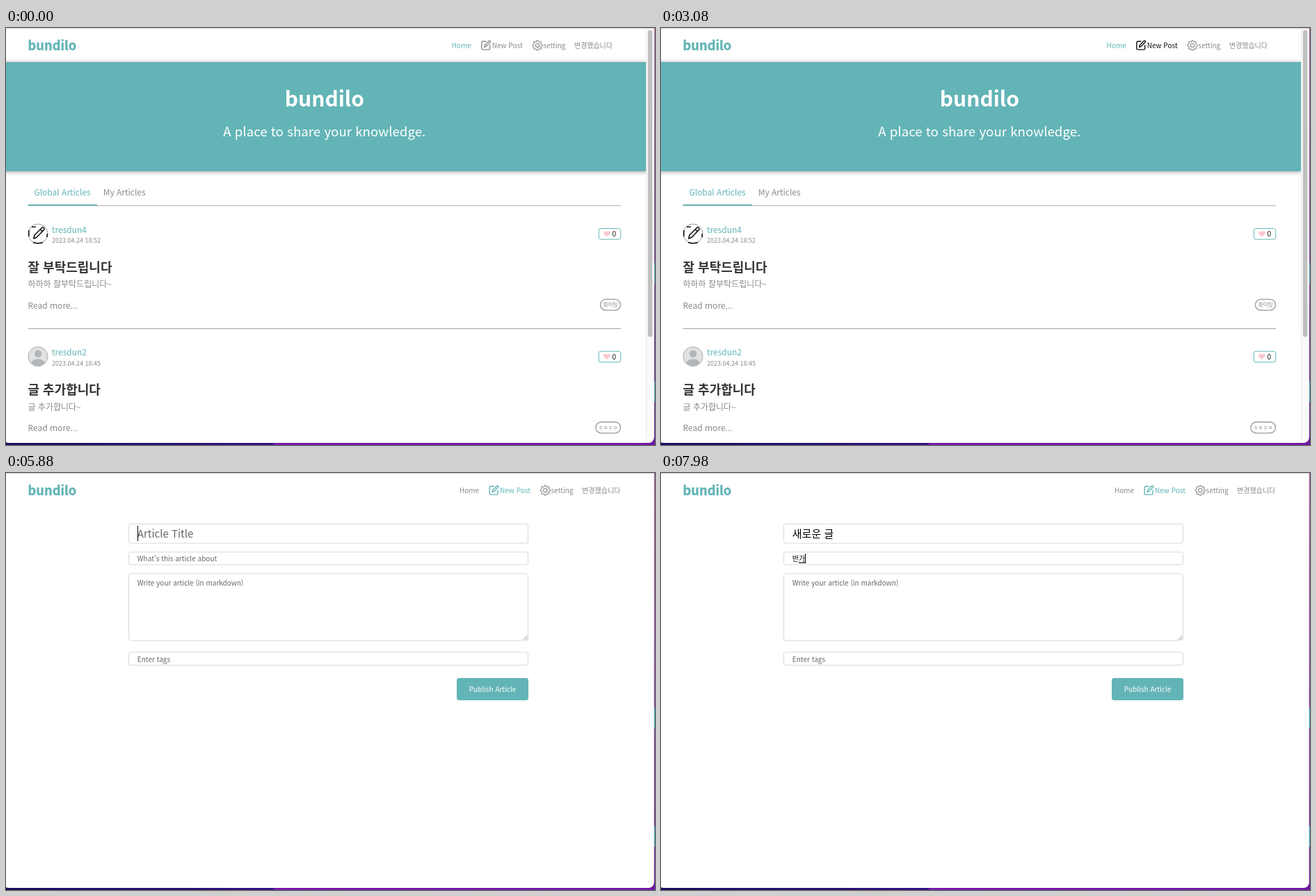
An HTML page for the animation above (8000 ms loop, 933x600 px).

```html
<!DOCTYPE html>
<html lang="ko">
<head>
<meta charset="utf-8">
<style>
html, body { margin: 0; width: 100%; height: 100%; overflow: hidden; background: #fff; }
svg { display: block; width: 933px; height: 600px; }
text { font-family: "Noto Sans CJK KR", "Noto Sans CJK JP", "Noto Sans", sans-serif; white-space: pre; fill: currentColor; }
.line { fill: none; stroke: currentColor; }
.field { fill: #fff; stroke: #d8d8d8; }
</style>
</head>
<body>
<svg id="stage" viewBox="0 0 933 600"></svg>
<script>
const TEAL = '#63b4b6', GRAY = '#8a8a8a', DARK = '#333', LOOP = 8000;
const text = (x, y, size, color, body, extra = '') =>
  `<text x="${x}" y="${y}" font-size="${size}" color="${color}" ${extra}>${body}</text>`;
const field = (y, h) => `<rect class="field" x="176.5" y="${y}" width="574" height="${h}" rx="3"/>`;

// Cog outline: a circle whose radius swells at eight teeth
const cog = Array.from({ length: 96 }, (_, i) => {
  const a = i / 96 * 2 * Math.PI;
  const r = 6.3 + Math.max(-.8, Math.min(.8, 1.3 * Math.cos(8 * a)));
  return `${(764 + r * Math.cos(a)).toFixed(2)},${(25 + r * Math.sin(a)).toFixed(2)}`;
}).join(' ');

const nav = `<g id="nav">
  <g id="home">${text(640.6, 29.2, 10, 'inherit', 'Home')}</g>
  <g id="newPost">
    <g class="line" stroke-width="1.4" stroke-linejoin="round" stroke-linecap="round">
      <path d="M690 19.2h-4.5q-1.7 0-1.7 1.7v8.5q0 1.7 1.7 1.7h8.5q1.7 0 1.7-1.7V25"/>
      <path d="M687.6 27.5l.6-2.7 6.3-6.3q.8-.6 1.6.2t.2 1.6l-6.2 6.4z"/>
    </g>
    ${text(698.7, 29.2, 10, 'inherit', 'New Post')}
  </g>
  <g color="${GRAY}">
    <polygon class="line" stroke-width="1.1" points="${cog}"/>
    <circle class="line" stroke-width="1.1" cx="764" cy="25" r="2.7"/>
  </g>
  ${text(772.3, 29.2, 10, GRAY, 'setting')}
  ${text(816.8, 29.2, 10, GRAY, '변경했습니다')}
</g>`;

const post = (dy, avatar, user, date, title, about, tag, tagWidth) => `<g transform="translate(0 ${dy})">
  ${avatar}
  ${text(66, 294.6, 12, TEAL, user)}
  ${text(66, 309.2, 9, GRAY, date)}
  ${text(31.5, 350.8, 18, DARK, title, 'font-weight="700"')}
  ${text(31.5, 373.4, 12, GRAY, about)}
  ${text(31.5, 403.6, 12, GRAY, 'Read more...')}
  <rect x="852.2" y="288.5" width="31.5" height="15.6" rx="3" fill="#fff" stroke="${TEAL}"/>
  <path d="M863.8 300.2c-2-1.6-4.8-3.5-4.8-5.8 0-2.6 3.6-3.1 4.8-.8 1.2-2.3 4.8-1.8 4.8.8 0 2.3-2.8 4.2-4.8 5.8z" fill="#f8c8cf"/>
  ${text(871.4, 299.9, 10, '#111', '0')}
  <rect x="${883.4 - tagWidth}" y="390.3" width="${tagWidth}" height="15.8" rx="7.9" fill="#fff" stroke="#999" stroke-width="1.3"/>
  ${text(883.4 - tagWidth / 2, 401, 7.6, GRAY, tag, 'text-anchor="middle"')}
</g>`;

const penAvatar = `<circle cx="46" cy="296" r="14" fill="#fff" stroke="#999"/>
  <g class="line" color="#111" stroke-width="1.6">
    <path d="M37 286.2h6M32.8 291v9M59.2 296v5M39 308.6q7 2.4 14 0"/>
    <path d="M39.8 303l1.2-5 10.7-10.7q1.2-1 2.6.2t.4 2.7L44 301.300z M49.3 289.700l3 3" stroke-linejoin="round"/>
  </g>`;
const blankAvatar = `<circle cx="46" cy="296" r="14" fill="#e0e2e3" stroke="#aaa"/>
  <circle cx="46" cy="292" r="5.2" fill="#b2b6b9"/>
  <path d="M36.200 305.500q1.500-6 9.800-6t9.800 6a14 14 0 0 1-19.600 0z" fill="#b2b6b9"/>`;

const feed = `<g id="feed">
  <rect x="-10" y="49" width="930.5" height="157" fill="${TEAL}" filter="url(#shadow)"/>
  <rect x="0" y="49" width="920.5" height="157" fill="${TEAL}"/>
  ${text(457.9, 113.4, 30, '#fff', 'bundilo', 'font-weight="700" text-anchor="middle"')}
  ${text(457.7, 156.2, 18.7, '#fff', 'A place to share your knowledge.', 'text-anchor="middle"')}
  ${text(40.4, 240.6, 12, TEAL, 'Global Articles')}
  ${text(139.7, 240.6, 12, GRAY, 'My Articles')}
  <rect x="31.5" y="255" width="852.5" height="1.2" fill="#bbb"/>
  <rect x="31.5" y="253.800" width="99.5" height="2" fill="${TEAL}"/>
  ${post(0, penAvatar, 'tresdun4', '2023.04.24 18:52', '잘 부탁드립니다', '하하하 잘부탁드립니다~', '화이팅', 29)}
  <rect x="31.5" y="431.8" width="852.5" height="1.3" fill="#b0b0b0"/>
  ${post(176.7, blankAvatar, 'tresdun2', '2023.04.24 18:45', '글 추가합니다', '글 추가합니다~', 'ㅎㅇㅎㅇ', 35.6)}
  <rect x="920.5" y="1" width="11" height="587" fill="#fafafa"/>
  <rect x="920" y="1" width="1" height="596" fill="#e8e8e8"/>
  <rect x="922.8" y="3" width="6.4" height="441.5" rx="3.2" fill="#c0c0c0"/>
</g>`;

const editor = `<g id="editor">
  ${field(73.3, 27.8)}${field(113.8, 18.2)}${field(144.8, 96.2)}${field(257.800, 18.7)}
  <path class="line" color="#777" stroke-width=".8" d="M743.5 240l6-6M747 240l2.500-2.500"/>
  <text id="title" x="188.8" y="93.4" font-size="15"></text>
  <text id="about" x="188.8" y="127" font-size="10"></text>
  ${text(188.8, 162.4, 10, '#666', 'Write your article (in markdown)')}
  ${text(188.8, 271.5, 10, '#666', 'Enter tags')}
  <rect x="648" y="295" width="103" height="32" rx="3.500" fill="${TEAL}"/>
  ${text(699.5, 314.900, 10, '#fff', 'Publish Article', 'text-anchor="middle"')}
  <rect id="underline" height="1.2"/>
  <rect id="caret" width="1"/>
</g>`;

document.getElementById('stage').innerHTML = `<defs>
  <filter id="shadow" x="-5%" y="-10%" width="110%" height="120%"><feDropShadow dx="0" dy="1" stdDeviation="3" flood-color="#000" flood-opacity=".4"/></filter>
  <clipPath id="page"><rect width="920.5" height="597"/></clipPath>
  <linearGradient id="floor"><stop offset="0" stop-color="#1d0b5e"/><stop offset=".41" stop-color="#301482"/>
    <stop offset=".415" stop-color="#7519ad"/><stop offset="1" stop-color="#6f16a8"/></linearGradient>
  <linearGradient id="wall" x2="0" y2="1"><stop offset="0" stop-color="#a35a9c"/><stop offset="1" stop-color="#6b1c9c"/></linearGradient>
</defs>
<rect width="933" height="600" fill="url(#floor)"/>
<rect x="925" width="8" height="597" fill="url(#wall)"/>
<path d="M925 338h8v30h-8zM925 508h8v30h-8z" fill="#3f9fb4"/>
<rect x="-4" y="-12" width="935.7" height="609" rx="8" fill="#fff"/>
<rect width="932" height="1" fill="#d0d0d0"/>
${feed}${editor}
${text(31.6, 32.3, 18.3, TEAL, 'bundilo', `font-weight="700" stroke="${TEAL}" stroke-width=".35"`)}
${nav}`;

const $ = id => document.getElementById(id);
const set = (el, attrs) => { for (const k in attrs) el.setAttribute(k, attrs[k]); };

// Start time, title, about, focused field with a lit caret, last syllable being composed
const steps = [
  [0, '', '', ''],
  [4410, '', '', 'title'],
  [4830, 't', '', 'title'],
  [5320, '', '', ''],
  [5880, '', '', 'title'],
  [6020, 'ㅅ', '', 'title', true],
  [6090, '새', '', 'title', true],
  [6230, '샐', '', 'title', true],
  [6370, '새로', '', 'title', true],
  [6440, '새롱', '', 'title', true],
  [6510, '새로우', '', 'title', true],
  [6580, '새로운', '', 'title', true],
  [6720, '새로운 ', '', 'title'],
  [6790, '새로운 ㄱ', '', 'title', true],
  [6860, '새로운 그', '', 'title', true],
  [7000, '새로운 글', '', 'title', true],
  [7210, '새로운 글', '', 'about'],
  [7630, '새로운 글', 'ㅂ', 'about', true],
  [7700, '새로운 글', '바', 'about', true],
  [7770, '새로운 글', '반', 'about', true],
  [7910, '새로운 글', '반ㄱ', 'about', true],
  [7980, '새로운 글', '반가', 'about', true],
];

function fill(el, value, placeholder) {
  el.textContent = value || placeholder;
  el.setAttribute('color', value ? '#000' : '#666');
}

function drawEditor(t) {
  const [, title, about, focus, composing] = steps.findLast(s => s[0] <= t);
  fill($('title'), title, 'Article Title');
  fill($('about'), about, "What's this article about");
  $('caret').style.display = focus ? '' : 'none';
  $('underline').style.display = composing ? '' : 'none';
  if (!focus) return;
  const el = $(focus), value = focus === 'title' ? title : about;
  const end = value ? 188.8 + el.getComputedTextLength() : 188.8;
  set($('caret'), { x: Math.round(end), y: focus === 'title' ? 76 : 116, height: focus === 'title' ? 22 : 14 });
  if (composing) {
    const start = el.getStartPositionOfChar(value.length - 1).x;
    set($('underline'), { x: start, y: focus === 'title' ? 98.3 : 128.5, width: end - start });
  }
}

function draw() {
  const t = performance.now() % LOOP, editing = t >= 3500;
  $('feed').style.display = editing ? 'none' : '';
  $('editor').style.display = editing ? '' : 'none';
  set($('nav'), { transform: `translate(${editing ? 11.3 : 0} 0)` });
  set($('home'), { color: editing ? GRAY : TEAL });
  set($('newPost'), { color: t < 3080 ? GRAY : t < 3780 ? '#111' : TEAL });
  if (editing) drawEditor(t);
  requestAnimationFrame(draw);
}
draw();
</script>
</body>
</html>
```
